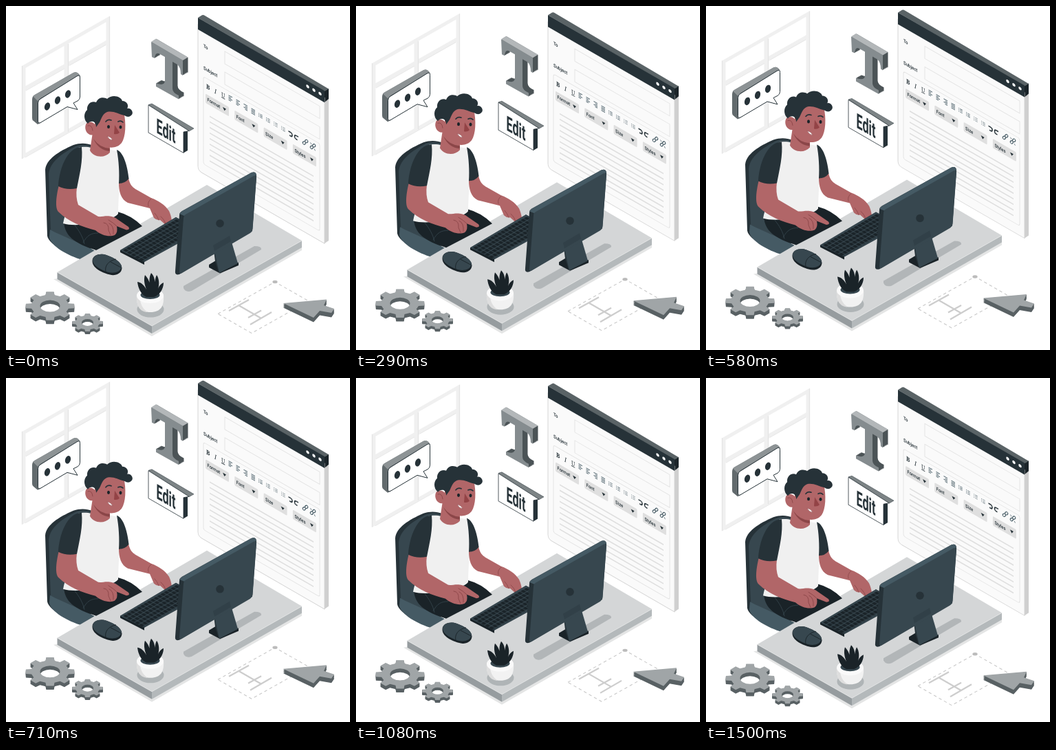
Animation of 500x500 px, one loop 1.54 s. Source, as an HTML page:

```html
<!DOCTYPE html>
<html lang="en">
<head>
<meta charset="utf-8">
<title>Editing at a desk</title>
<style>
  html, body { margin: 0; width: 100%; height: 100%; overflow: hidden; background: #fff; }
  svg { display: block; width: 100%; height: 100%; }
  text { font-family: Roboto, "Liberation Sans", sans-serif; font-weight: 500; fill: #263238; }
  .dark { fill: #263238; } .slate { fill: #37474f; } .steel { fill: #455a64; } .ink { fill: #1a2328; }
  .skin { fill: #b16668; } .line { fill: none; stroke: #263238; stroke-linecap: round; }
  .crease { fill: none; stroke: #8b4648; stroke-linecap: round; }
</style>
</head>
<body>
<svg viewBox="0 0 500 500">
<defs>
  <pattern id="keys" width="5.7" height="6.6" patternUnits="userSpaceOnUse">
    <rect x=".5" y=".5" width="4.700" height="5.500" rx=".8" class="ink"/>
  </pattern>
</defs>
<g id="scene">

  <!-- wall window -->
  <g fill="none" stroke="#f0f0f0" stroke-width="5">
    <path d="M26 88.500L148 19V149L26 218Z"/>
    <path d="M87.500 53V184M26 121L148 52" stroke-width="6"/>
    <path d="M23.500 87V222M90.500 55V183M150.500 15V148" stroke="#e4e4e4" stroke-width="1.300"/>
    <path d="M29 123L85 91M93 86L145 56.500M28 220L148 152" stroke="#e8e8e8" stroke-width="1"/>
  </g>

  <!-- speech bubble -->
  <path d="M38 136Q38 131 42 129L98 97Q102 95 105 98L108 102L50 170L46 172L40 167Q38 166 38 163Z" fill="#626a6d"/>
  <path d="M39 131L42 129L98 97Q102 95 105 98L107 100L50 134L46 138Z" fill="#8d9395"/>
  <path d="M46.500 141Q46.500 137 50 135L103 102Q107.500 99 107.500 104V132Q107.500 136 104 138L98 141L104 150.500L89 146.500L51 169Q46.500 172 46.500 167Z" fill="#fff" stroke="#263238" stroke-width="1"/>
  <g class="dark">
    <ellipse cx="60" cy="146" rx="3.900" ry="5.900" transform="rotate(18 60 146)"/>
    <ellipse cx="75" cy="137" rx="3.900" ry="5.900" transform="rotate(18 75 137)"/>
    <ellipse cx="90" cy="128" rx="3.900" ry="5.900" transform="rotate(18 90 128)"/>
  </g>

  <g id="letter"></g>
  <path d="M211 52L218 47.500L264.500 74.500L257 79Z" fill="#b3b7b9"/>

  <!-- Edit tag -->
  <path d="M207 143.500L212 142L273 178L266 182Z" fill="#7d8486" stroke="#263238" stroke-width=".5"/>
  <path d="M258 183L264 180V210L258 213.500Z" class="dark"/>
  <path d="M207 144L266 181.500L258 183V213.500L207 184Z" fill="#fff" stroke="#263238" stroke-width=".8" stroke-linejoin="round"/>
  <text transform="matrix(.54 .31 0 1 218.500 184)" font-size="30" style="font-weight:700">Edit</text>

  <!-- mail panel -->
  <path d="M463 123L469 120V341L463 345Z" fill="#cfcfcf"/>
  <path d="M463 123L469 120V135L463 140Z" class="ink"/>
  <path d="M279 17L285 13.300Q287 12.500 289 14L469 120.500L463 124Z" fill="#5a6366"/>
  <g transform="matrix(1 .577 0 1 279 17)">
    <path d="M0 10H184V222H6Q0 222 0 216Z" fill="#fafafa" stroke="#d2d2d2" stroke-width=".9"/>
    <path d="M0 0H184V17H0Z" class="dark"/>
    <g fill="#fff"><circle cx="159.500" cy="8" r="2.200"/><circle cx="168.500" cy="8" r="2.200"/><circle cx="177.500" cy="8" r="2.200"/></g>
    <g fill="none" stroke="#e2e2e2" stroke-width=".9">
      <path d="M39 26.500h138v18h-138ZM39 56.500h138v18h-138Z"/>
      <rect x="8" y="81" width="169" height="127" rx="3"/>
    </g>
    <g id="tools"></g>
  </g>
  <g id="labels"></g>

  <!-- chair -->
  <path d="M57 238C58 223 77 211 98 202C113 197 128 201 134 209L122 370C97 364 62 348 60 334Z" class="dark"/>
  <path d="M62 244C64 226 82 214 101 204C114 199 126 203 131 209L122 365C96 358 67 345 65 330Z" class="slate"/>
  <path d="M64 325C82 335 104 342 132 357L111 369C90 363 65 349 63 336Z" class="steel"/>

  <!-- desk -->
  <path d="M69 397L212 480L430 355V345Z" fill="#e4e5e5"/>
  <path d="M74.500 387L212 465V476L74.500 397Z" fill="#969c9f"/>
  <path d="M212 465L430 341V351L212 476Z" fill="#b4b9bb"/>
  <path d="M74.500 387L292 260L430 341L212 465Z" fill="#d4d6d7"/>
  <path d="M74.500 387L212 465L430 341" fill="none" stroke="#e6e8e8" stroke-width=".8"/>

  <!-- legs -->
  <path d="M84 313C85 334 99 345 131 355L198 320Q182 304 162 299Z" class="ink"/>
  <path d="M100 319C106 326 112 336 114 346M134 330C124 330 118 333 112 344" fill="none" stroke="#37474f" stroke-width=".8"/>

  <!-- torso and arms -->
  <path d="M105 206C113 204 119 205 124 206L152 209Q162 210 165 214C168 230 164 263 163 302C156 312 105 323 83 316C86 300 92 287 102 272C98 245 97 225 105 206Z" fill="#f0f0f0"/>
  <path d="M164 257L178 250C180 260 184 263 188 266L211 279C222 283 231 289 237 298C241 307 242 315 240 322Q237 325 234 320L224 311Q219 312 215 308L209 294L177 286C167 281 164 270 164 257Z" class="skin"/>
  <path d="M211 280Q205 285 207 291M222 311Q220 305 216 301M233 319Q230 310 225 306" class="crease" stroke-width=".8"/>
  <path d="M161 209C172 213 177 236 178.500 251Q173 258 164 258C165 243 164 225 161 209Z" class="dark"/>
  <path d="M77 260C73 276 71 293 76 299C91 314 111 321 130 326C139 334 151 336 158 333Q163 329 161 320L175 325.500Q181 325 178 321L162 310C151 302 141 307 134 306L105 289Q101 278 103 264Z" class="skin"/>
  <path d="M142 315Q150 316 149 326L152 333M150 316Q157 319 156 331M149 311Q156 315 161 320" class="crease" stroke-width=".9"/>
  <path d="M110 205C88 205 77 239 76 262Q88 268 103 265C107 244 112 225 110 205Z" class="dark"/>

  <!-- head -->
  <path d="M126 184L151 198V213C143 222 127 220 122 210Z" class="skin"/>
  <path d="M127 193Q136 206 151 207L151 211Q135 210 127 193Z" fill="#8b4648"/>
  <path d="M130 152L171 153C175 171 174 190 168 199C160 209 144 207 134 198L128 187C119 190 113 180 116 172C119 167 126 168 129 172Z" class="skin"/>
  <path d="M119 171C112 165 113 155 118 151C117 142 125 137 131 140C134 132 143 132 147 135C154 128 167 131 169 138C176 138 179 145 176 149C181 147 187 155 182 159Q178 163 172 159C163 157 156 152 147 154C140 157 139 163 136 169L131 176Q131 170 127 168Q122 167 119 171Z" class="dark"/>
  <path d="M119 174Q125 172 126 181" class="crease" stroke-width=".9"/>
  <path d="M158 173L165 184Q162 187 157 186Z" fill="#934346"/>
  <ellipse cx="149" cy="175.500" rx="2" ry="2.600" class="ink"/>
  <ellipse cx="166.500" cy="176" rx="2" ry="2.600" class="ink"/>
  <path d="M145 168Q148 164 153 166M163 168Q167 166 170 169" class="line" stroke-width="1.700"/>
  <path d="M147 189Q150 195 155 195Q153 190 147 189Z" fill="#fff" stroke="#8b4648" stroke-width=".6"/>

  <!-- keyboard -->
  <path d="M166 355L247 307L283 327L201 372V376L166 358Z" class="ink"/>
  <path d="M166 355L247 307L283 327L201 372Z" class="slate"/>
  <rect width="92" height="34" transform="matrix(.866 -.5 .866 .5 169 355)" fill="url(#keys)"/>

  <!-- mouse -->
  <path d="M125.500 370C126 361 138 359 146 362C158 366 168.500 373 168.500 381C168 390 157 393 149 390C139 387 125 381 125.500 370Z" class="ink"/>
  <path d="M126 369C127 361 138 359 146 362C158 366 168 373 168 379C166 387 157 389 149 387C139 384 126 378 126 369Z" class="slate"/>
  <path d="M145 386C143 378 149 370 160 368M152 372L167 380" fill="none" stroke="#1a2328" stroke-width=".9"/>

  <!-- monitor -->
  <path d="M258 407L361 349Q372 349 371 354L270 414Q261 417 258 410Z" fill="#b2b6b8"/>
  <path d="M295 376L305 370L338 373V377L311 388.500L295 380Z" class="ink"/>
  <path d="M301 347L304 371L309 387L320 375Z" class="dark"/>
  <path d="M301 348L325 333L337 374L310 388Z" class="slate"/>
  <path d="M252 304Q252 300 256 298L357 242Q364 240 364 247L358 327L252 390Q245 392 246 385Z" class="dark"/>
  <path d="M252 302L256 298L357 242Q363 240 364 246L259 305Z" class="steel"/>
  <path d="M258 308Q258 305 261 303L360 247Q364 245 364 250L358.500 324Q358 328 355 330L255 388.500Q252 390 252 386Z" class="slate"/>
  <path d="M301 348L325 334L327 342L303 356Z" class="dark" opacity=".3"/>
  <circle cx="311" cy="316" r="5.800" class="dark"/>

  <!-- plant -->
  <ellipse cx="210" cy="441" rx="19.500" ry="11.500" fill="#afb4b6"/>
  <path d="M190 421C189 436 195 445 210 445S230 436 229 421Z" fill="#f2f2f2"/>
  <path d="M190 421C189 436 195 445 206 445C198 440 195 432 195 425Z" fill="#dedede"/>
  <ellipse cx="209.500" cy="421" rx="19.500" ry="11" fill="#fafafa"/>
  <ellipse cx="209.500" cy="420" rx="14" ry="6" class="slate"/>
  <path d="M204 423C196 419 192 410 191 401C197 402 201 406 204 412C201 404 200 397 202 391C207 396 209 402 210 408C207 399 209 392 211 388C216 393 217 400 216 407C216 400 217 395 219 391C223 397 223 405 221 411C223 406 225 404 229 402C229 412 223 420 215 423Z" class="ink"/>

  <!-- text frame on the floor -->
  <path d="M308 447.500L391 401L440 429L357 475.500Z" fill="none" stroke="#c9c9c9" stroke-width="1.100" stroke-dasharray="4.500 4"/>
  <ellipse cx="391" cy="401" rx="3.600" ry="2.200" fill="#bcbcbc"/>
  <path d="M324 443L353 427M338 435L371 454M355 463L386 445M352 453L371 442.500" fill="none" stroke="#cdcdcd" stroke-width="2.200"/>

  <g id="solids"></g>
</g>
</svg>
<script>
const $ = id => document.getElementById(id);
const path = (d, fill, x = 0, y = 0) =>
  `<path d="${d}" fill="${fill}" fill-rule="evenodd" transform="translate(${x} ${y})"/>`;

// Stacks shifted dark copies behind a lighter face.
function solid(d, dx, dy, face, side, steps = 8) {
  let out = '';
  for (let k = steps; k > 0; k--) out += path(d, side, dx * k / steps, dy * k / steps);
  return out + path(d, face);
}

function gear(cx, cy, r, hole, teeth) {
  const squash = .59, points = [];
  for (let i = 0; i < teeth; i++)
    for (const [a, s] of [[-.3, .78], [-.2, 1], [.2, 1], [.3, .78]]) {
      const angle = (i + a) / teeth * 2 * Math.PI;
      points.push([cx + r * s * Math.cos(angle), cy + r * s * squash * Math.sin(angle)]
        .map(n => n.toFixed(1)));
    }
  const arc = `a${hole} ${hole * squash} 0 1 0 `;
  return `M${points.join('L')}ZM${cx - hole} ${cy}${arc}${2 * hole} 0${arc}${-2 * hole} 0Z`;
}

const FACE = '#a0a5a7', SIDE = '#596164';
$('letter').innerHTML = solid('M211 52L257 79V101L254 99Q254 89 249 85L242 81V120Q242 126 251 130V135.500L218 117V112Q230 117 231 109V74L222 69Q217 67 216 76L212 74Z', 7.5, -4.3, '#858c8f', '#4c5457');
$('solids').innerHTML =
  solid(gear(64, 436, 35.5, 14.5, 8), 0, 5.5, FACE, SIDE) +
  solid(gear(118.5, 460, 22.5, 8.5, 8), 0, 4, FACE, SIDE) +
  solid('M403 432L466 426.500L462 435L477 440L473 446L456 443L447 453Z', 0, 6.5, FACE, SIDE);

// Panel toolbar, drop-downs and body lines, in panel coordinates.
let tools = '';
const stroke = (d, width = .9, color = '#455a64') =>
  tools += `<path d="${d}" fill="none" stroke="${color}" stroke-width="${width}"/>`;
for (let i = 0; i < 4; i++) {
  for (let row = 0; row < 4; row++) {
    const y = 87 + row * 2.2;
    stroke(`M${44.5 + i * 11 + (i == 2 && row % 2 ? 2 : 0)} ${y}h${row % 2 && i != 3 ? 3.5 : 5.5}`, 1);
    if (row < 3) {
      const x = 88 + i * 11;
      stroke(`M${x} ${y + 1}h1.200m1 0h3.500`, .8, i < 2 ? '#455a64' : '#78868c');
    }
  }
  const x = 11 + i * 42.3;
  tools += `<rect x="${x}" y="104" width="34" height="13.500" rx="1.500" fill="#dfdfdf"/>` +
    `<path d="M${x + 25} 109h5l-2.500 4z" class="dark"/>`;
}
stroke('M131.500 89h3.500a2 2.600 0 0 1 0 5.200h-2M146 89h-3.500a2 2.600 0 0 0 0 5.200h2', 1.6, '#263238');
for (const x of [156, 167])
  for (const [dx, y] of [[-1.7, 93], [1.7, 88.5]])
    tools += `<ellipse cx="${x + dx}" cy="${y}" rx="1.600" ry="2.700" fill="none" stroke="#455a64" transform="rotate(35 ${x + dx} ${y})"/>`;
stroke('M163.500 87l1.500 2M170.500 95l-1.500-2', .8);
for (let i = 0; i < 9; i++) stroke(`M17 ${133.5 + i * 8.1}H168`, 1.8, '#dfdfdf');
$('tools').innerHTML = tools;

const label = (text, x, y, size, style = '') =>
  `<text transform="matrix(.866 .5 0 1 ${x} ${y})" font-size="${size}" style='${style}'>${text}</text>`;
const serif = 'font-family:"Noto Serif",serif;';
$('labels').innerHTML =
  label('To', 287, 60, 7) + label('Subject', 287, 92, 7) +
  label('B', 291, 119.5, 9, serif + 'font-weight:700') +
  label('I', 303, 126.5, 9, serif + 'font-style:italic') +
  label('U', 313, 131, 8.5, serif + 'font-weight:400;text-decoration:underline') +
  ['Format', 'Font', 'Size', 'Styles'].map((t, i) => label(t, 292.5 + i * 42.3, 138 + i * 24.7, 6.8)).join('');

// The scene drifts up and down at constant speed, 37 steps per loop.
const LOOP = 1540, STEPS = 37, RISE = 10, LEAD = 30;
const height = t => RISE * (1 - Math.abs(1 - 2 * ((t + LEAD) % LOOP) / LOOP));
function draw(now) {
  const step = Math.floor((now % LOOP + 5) / LOOP * STEPS);
  const y = height(0) - height(step * LOOP / STEPS);
  $('scene').setAttribute('transform', `translate(0 ${y.toFixed(2)})`);
  requestAnimationFrame(draw);
}
draw(0);
</script>
</body>
</html>
```
